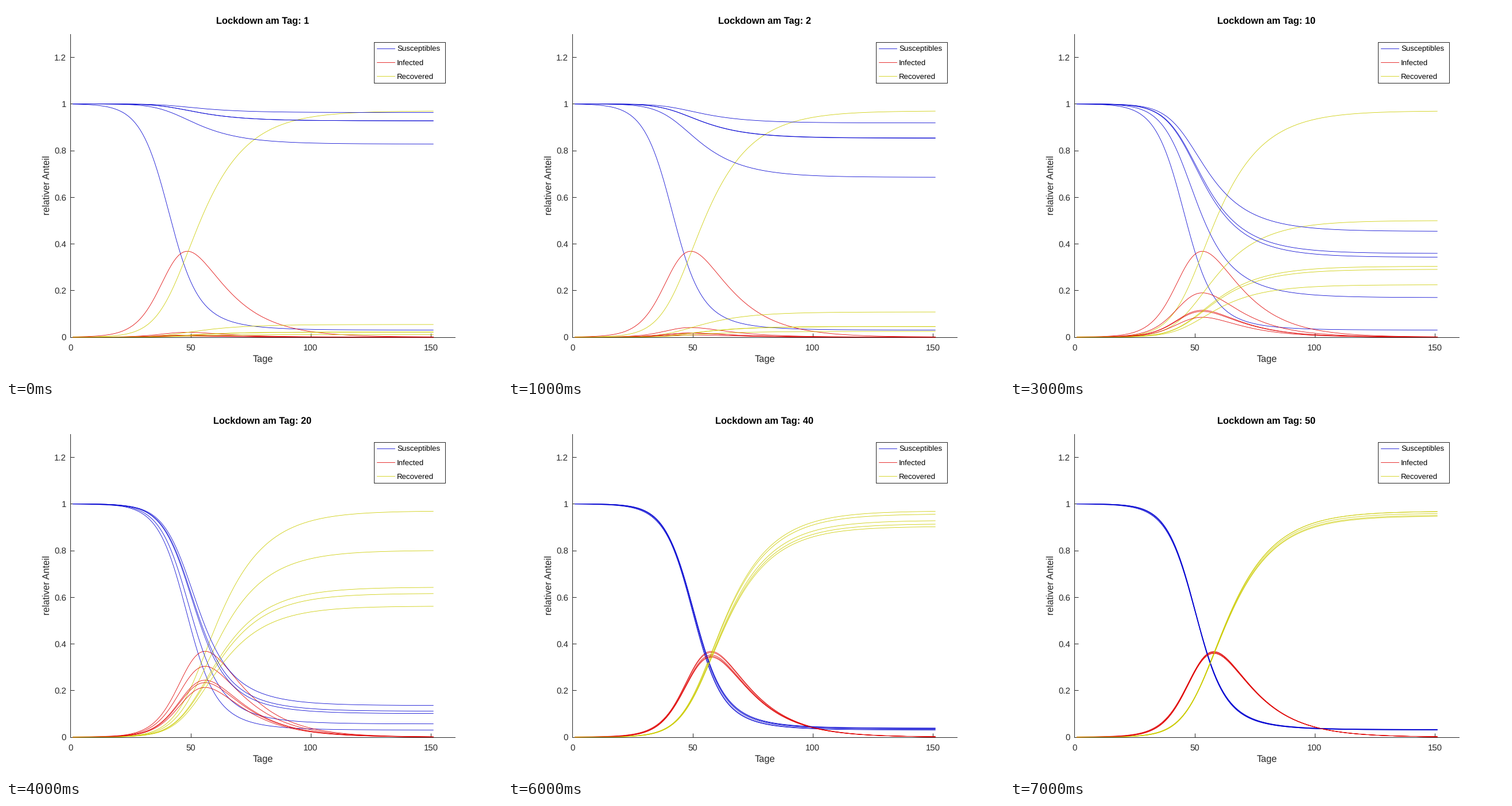
Animation of 864x648 px, one loop 8 s. Source, as a matplotlib script:

```python
import numpy as np
import matplotlib.pyplot as plt
from matplotlib.animation import FuncAnimation

W, H, DPI = 864, 648, 72
INK = "#262626"
BLUE, RED, YELLOW = (0, 0, 0.82), (0.88, 0, 0), (0.8, 0.8, 0)
LOCKDOWN_DAYS = [1, 2, 5, 10, 20, 30, 40, 50]

REGIONS, STEPS = 5, 150
BETA, GAMMA, START = 0.25, 1 / 14, 0.001


def mixing():
    """Daily exchange between each pair of regions, as a transition matrix."""
    m = np.zeros((REGIONS, REGIONS))
    m[np.triu_indices(REGIONS, 1)] = [.05, .02, .02, .01, .021, .011, .032, .02, .01, .013]
    m += m.T
    m += np.diag(1 - m.sum(axis=1))
    m[0, 1:] *= 0.99  # slightly weaker return to the first region
    return m


def simulate(lockdown, mix):
    """Daily S, I and R of every region; exchange stops at the lockdown."""
    s, i, r = np.ones(REGIONS), np.zeros(REGIONS), np.zeros(REGIONS)
    i[0] = START
    s[0] -= START
    days = [(s, i, r)]
    for day in range(STEPS):
        if day < lockdown:
            i, r = mix @ i, mix @ r
            s = 1 - mix @ (1 - s)
        s, i, r = (s - BETA * s * i,
                   i + BETA * s[0] * i - GAMMA * i,
                   r + GAMMA * i)
        days.append((s, i, r))
    return np.array(days)


plt.rcParams["font.family"] = "Liberation Sans"
plt.rcParams["text.hinting"] = "none"
fig = plt.figure(figsize=(W / DPI, H / DPI), dpi=DPI, facecolor="white")
ax = fig.add_axes([0.13, 0.11, 0.775, 0.815])
ax.set(xlim=(0, 160), ylim=(0, 1.3))
ax.set_xticks(range(0, 151, 50))
ax.set_yticks(np.arange(0, 1.3, 0.2))
ax.tick_params(direction="in", length=6.7, width=1, color=INK,
               labelbottom=False, labelleft=False)
ax.spines[["top", "right"]].set_visible(False)
ax.spines[["left", "bottom"]].set(color=INK, linewidth=1)


def label(x, y, text, size, color=INK, **kw):
    kw = {"ha": "center", "va": "baseline", **kw}
    return fig.text(x / W, 1 - y / H, text, fontsize=size, color=color, **kw)


def stroke(xs, ys, color, width):
    line = plt.Line2D(np.array(xs) / W, 1 - np.array(ys) / H,
                      color=color, linewidth=width, transform=fig.transFigure)
    fig.add_artist(line)


for day in range(0, 151, 50):
    label(112.3 + day * 4.185, 600, str(day), 15)
for k in range(7):
    label(105, 582.2 - k * 81.25, f"{k / 5:g}", 15, ha="right")
label(447.5, 620, "Tage", 16.5)
label(75.7, 312.5, "relativer Anteil", 16.5, rotation=90, rotation_mode="anchor")
title = label(447, 30.3, "", 16.5, "black", weight="bold")

stroke([641, 765, 765, 641, 641], [63, 63, 134, 134, 63], INK, 1)
for k, (color, name) in enumerate(((BLUE, "Susceptibles"), (RED, "Infected"),
                                   (YELLOW, "Recovered"))):
    y = 74 + 24.2 * k
    stroke([646, 677], [y, y], color, 0.8)
    label(681.2, y + 4.3, name, 13.3, "black", ha="left")

t = np.arange(1, STEPS + 2)
curves = [[ax.plot([], [], color=c, linewidth=0.8, clip_on=False, zorder=3)[0]
           for c in (BLUE, RED, YELLOW)] for _ in range(REGIONS)]
mix = mixing()
runs = [simulate(day, mix) for day in LOCKDOWN_DAYS]


def draw(n):
    title.set_text(f"Lockdown am Tag: {LOCKDOWN_DAYS[n]}")
    for region, lines in enumerate(curves):
        for kind, line in enumerate(lines):
            line.set_data(t, runs[n][:, kind, region])
    return [title] + [line for lines in curves for line in lines]


anim = FuncAnimation(fig, draw, frames=len(LOCKDOWN_DAYS), interval=1000, repeat=True)
plt.show()
```
